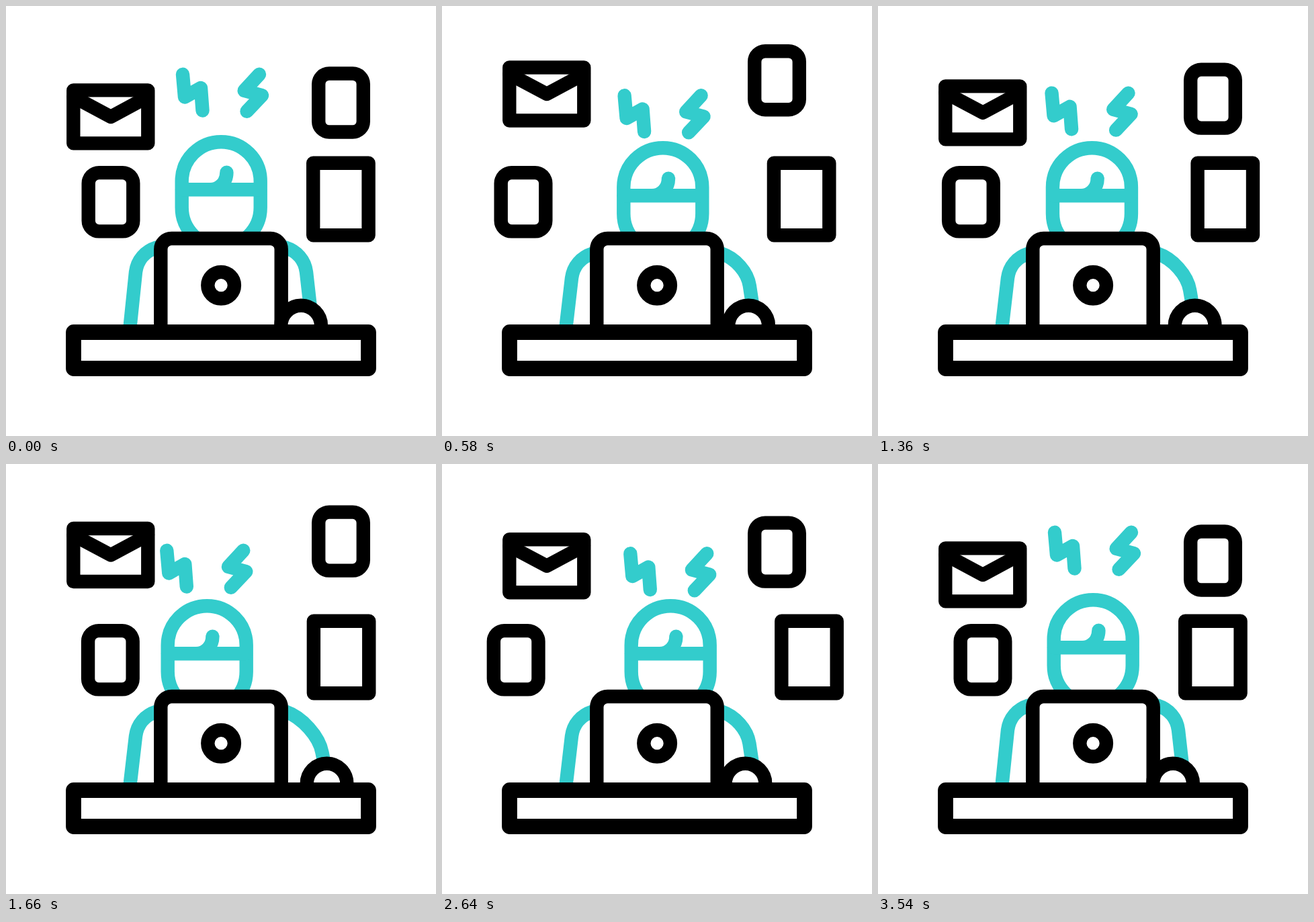
An HTML page that plays this animation: 640 px wide and 640 px high, repeating every 3600 ms.

```html
<!DOCTYPE html>
<html lang="en">
<head>
<meta charset="utf-8">
<title>Busy desk</title>
<style>
  html, body { margin: 0; width: 100%; height: 100%; overflow: hidden; background: #fff; }
  svg { display: block; width: 100vw; height: 100vh; }
  .ink, .teal { fill: none; stroke-width: 20.4; stroke-linecap: round; stroke-linejoin: round; }
  .ink { stroke: #000; }
  .teal { stroke: #33cccc; }
  .solid { fill: #fff; }
</style>
</head>
<body>
<svg viewBox="0 0 640 640">
  <g id="mail" class="ink">
    <rect x="100.3" y="125.4" width="111" height="79"/>
    <path d="M100.5 135.3 L156 164.9 L211 135.3"/>
  </g>
  <rect id="phoneL" class="ink" x="122.7" y="248.1" width="66.6" height="87.3" rx="15.8"/>
  <rect id="phoneR" class="ink" x="465.2" y="100.5" width="66.6" height="87" rx="15.8"/>
  <rect id="doc" class="ink" x="457.2" y="233.8" width="82.4" height="107.5"/>

  <g id="bolts" class="teal">
    <path d="M263 101.8 L266 135.5 L290 122 L292.5 155.5"/>
    <path d="M377 101.8 L354.6 126 L381 133 L358.5 156.8"/>
  </g>
  <g id="head" class="teal">
    <rect x="261.7" y="202.2" width="117" height="156.3" rx="58.5"/>
    <path d="M262 273.3 H378 M328.4 247.8 C328.4 262 318 273.3 304 273.3"/>
  </g>
  <path id="armL" class="teal"/>
  <path id="armR" class="teal"/>

  <path class="ink solid" d="M230.3 486 V362 a16 16 0 0 1 16 -16 H393.7 a16 16 0 0 1 16 16 V486"/>
  <circle class="ink" cx="320.1" cy="415.7" r="19.8"/>
  <path id="mouse" class="ink solid" d="M409.3 480 V475.5 a29.8 29.8 0 0 1 59.6 0 V480"/>
  <rect class="ink solid" x="100.5" y="485.5" width="439" height="54" style="stroke-width:22.8"/>
</svg>
<script>
const LOOP = 3600, SWAY = 860, BOB = 600, REACH = 540;
const el = id => document.getElementById(id);

const linear = (t, from, to) => Math.min(1, Math.max(0, (t - from) / (to - from)));
const ramp = (t, from, to) => {
  const u = linear(t, from, to);
  return u * u * (3 - 2 * u);
};
// eased swing 0 -> 1 -> 0, repeated, at rest after `count` swings
const wave = (t, half, count) => {
  const u = Math.min(t / half, 2 * count) % 2;
  return ramp(u < 1 ? u : 2 - u, 0, 1);
};

function move(id, x, y) {
  el(id).setAttribute("transform", `translate(${x.toFixed(2)} ${y.toFixed(2)})`);
}

function draw(t) {
  // floating items; the last bob is slightly quicker
  const sway = wave(t, SWAY, 2);
  const bob = wave(t + Math.max(0, t - 4 * BOB) * 0.053, BOB, 3);
  move("mail", 0, -34 * bob);
  move("phoneR", 0, -33.4 * bob);
  move("phoneL", -46.5 * sway, 0);
  move("doc", 48.8 * sway, 0);

  // duck, look right, left, right, then sit up again
  const back = ramp(t, 2700, 3240);
  const duck = ramp(t, 0, 300) - back;
  const look = 20 * (ramp(t, 300, 920) - back)
    + 41 * (ramp(t, 1965, 2555) - ramp(t, 1080, 1620));
  const drop = 9 * duck;
  move("head", look, drop);

  const lag = ramp(t, 580, 1060) - back;
  const lift = ramp(t, 580, 1660) - ramp(t, 2080, 2640);
  move("bolts", look - 2.7 * lag, drop + 22.5 * duck - 4.5 * lift);

  const mouse = 17 * linear(t, 0, 580) + 21.5 * linear(t, 580, 1660)
    - 15 * linear(t, 1660, 2080) - 23.5 * ramp(t, 2080, 3240);
  move("mouse", mouse, 0);

  el("armL").setAttribute("d",
    `M184.5 478 L193 ${396 + drop} C195.4 ${378 + drop} 207 ${365 + drop} 224 ${359.5 + drop}`);

  const a = 0.45 * wave(t, REACH, 3) + 0.55 * (ramp(t, 500, 1620) - ramp(t, 1620, 2080));
  const ex = 447 + 24 * a, ey = 396 + drop + 25 * a;
  el("armR").setAttribute("d",
    `M416 ${359.5 + drop} C${433 + 8 * a} ${365 + drop + 3 * a} ` +
    `${ex - 2.3 - 2 * a} ${ey - 18 - 6 * a} ${ex} ${ey} L${456 + 24 * a} 476`);
}

const start = performance.now();
function tick(now) {
  draw(Math.max(0, now - start) % LOOP);
  requestAnimationFrame(tick);
}
draw(0);
requestAnimationFrame(tick);
</script>
</body>
</html>
```
